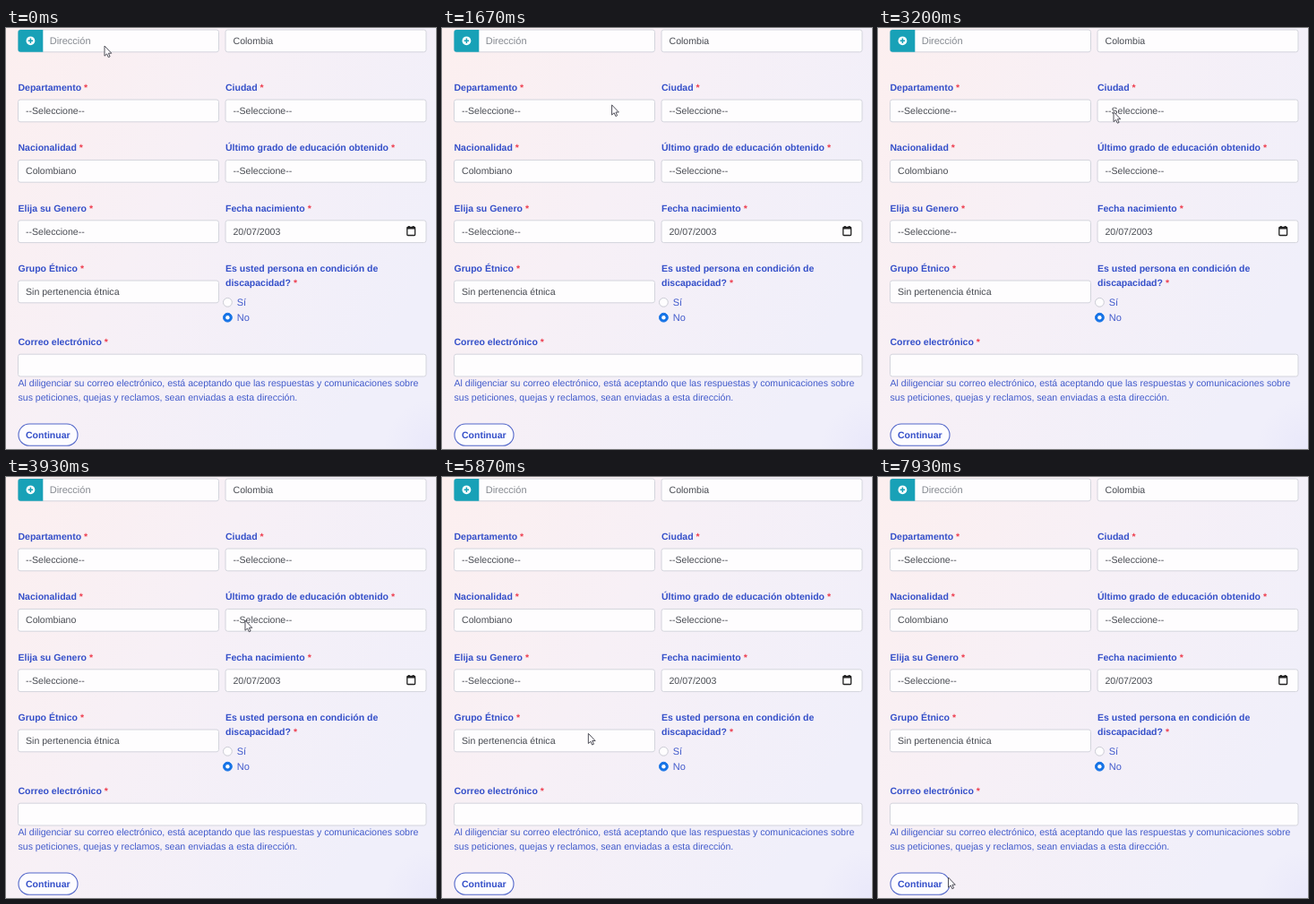
Write an HTML page that moves like this. It is 480 px wide and 470 px high and loops after 8000 ms.

```html
<!DOCTYPE html>
<html lang="es">
<head>
<meta charset="utf-8">
<title>Formulario</title>
<style>
  html, body { margin: 0; width: 100%; height: 100%; overflow: hidden; }
  svg { display: block; width: 100%; height: 100%; }
  text {
    font: 10.57px "Liberation Sans", Arial, sans-serif;
    fill: #484b52;
    text-rendering: geometricPrecision;
  }
  .label { font-weight: bold; font-size: 10.5px; fill: #344fc9; }
  .label tspan { fill: #ee3f50; }
  .help { fill: #415acb; }
  .option { font-size: 11px; }
  .hint { font-size: 11px; fill: #858990; }
  .field { fill: #fefdfe; stroke: #d3d4dc; }
</style>
</head>
<body>
<svg viewBox="0 0 480 470" preserveAspectRatio="none">
  <defs>
    <linearGradient id="base" x1="0" y1="0" x2="1" y2="0.55">
      <stop offset="0" stop-color="#fcefef"/>
      <stop offset="0.45" stop-color="#f7f0f6"/>
      <stop offset="1" stop-color="#f0effa"/>
    </linearGradient>
    <radialGradient id="corner" cx="1" cy="1" r="0.12">
      <stop offset="0" stop-color="#e9e8fa"/>
      <stop offset="1" stop-color="#e9e8fa" stop-opacity="0"/>
    </radialGradient>
    <filter id="soft" filterUnits="userSpaceOnUse" x="0" y="0" width="480" height="470"
      color-interpolation-filters="sRGB">
      <feGaussianBlur stdDeviation="0.4"/>
    </filter>
  </defs>
  <rect width="480" height="470" fill="url(#base)"/>
  <rect width="480" height="470" fill="url(#corner)"/>
  <g id="form" filter="url(#soft)"></g>
  <path id="cursor" d="M0 0V11.2L2.6 8.9L4.3 12.7L6.1 11.9L4.4 8.2H7.8Z"
    fill="#fdfcff" stroke="#505059" stroke-width="1" stroke-linejoin="round"/>
</svg>
<script>
const NS = "http://www.w3.org/2000/svg";
const form = document.getElementById("form");
const cursor = document.getElementById("cursor");
const LEFT = 13.5, RIGHT = 245;

function add(tag, attrs, content) {
  const el = document.createElementNS(NS, tag);
  for (const key in attrs) el.setAttribute(key, attrs[key]);
  if (content) el.textContent = content;
  form.append(el);
  return el;
}

function write(x, y, content, cls = "") {
  return add("text", { x, y, class: cls }, content);
}

function label(x, y, content, required = true) {
  const el = write(x, y, content, "label");
  if (!required) return;
  el.append(" ");
  const star = document.createElementNS(NS, "tspan");
  star.textContent = "*";
  el.append(star);
}

function field(x, y, content, width = 224) {
  add("rect", { x, y, width, height: 24.8, rx: 2.5, class: "field" });
  if (content) write(x + 8.5, y + 16, content);
}

function radio(y, content, on) {
  add("circle", { cx: 247.4, cy: y, r: 4.9, fill: on ? "#1673e6" : "#fefdfe", stroke: on ? "#1673e6" : "#c9cad3" });
  if (on) add("circle", { cx: 247.4, cy: y, r: 2.2, fill: "#fff" });
  write(257.7, y + 3.3, content, "help option");
}

function build() {
  field(LEFT, 2, "");
  add("path", { d: "M41.3 2H16.3Q13.5 2 13.5 4.8V24Q13.5 26.8 16.3 26.8H41.3Z", fill: "#18a1b7" });
  add("circle", { cx: 27.4, cy: 14.3, r: 4.9, fill: "#f5fcfd" });
  add("path", { d: "M24.7 14.3H30.1M27.4 11.6V17", stroke: "#18a1b7", "stroke-width": 1.5 });
  write(48.7, 18.1, "Dirección", "hint");
  field(RIGHT, 2, "Colombia");

  const pick = "--Seleccione--";
  const rows = [
    ["Departamento", pick, "Ciudad", pick],
    ["Nacionalidad", "Colombiano", "Último grado de educación obtenido", pick],
    ["Elija su Genero", pick, "Fecha nacimiento", "20/07/2003"]
  ];
  rows.forEach(([nameA, valueA, nameB, valueB], i) => {
    const y = 80 + i * 67.4;
    label(LEFT, y - 10.2, nameA);
    field(LEFT, y, valueA);
    label(RIGHT, y - 10.2, nameB);
    field(RIGHT, y, valueB);
  });

  add("rect", { x: 447.8, y: 222.5, width: 8.8, height: 9, rx: 0.8, fill: "none", stroke: "#222", "stroke-width": 1.3 });
  add("path", { d: "M447.8 223.5H456.6M449.8 221V223M454.6 221V223", stroke: "#222", "stroke-width": 2 });

  label(LEFT, 272, "Grupo Étnico");
  field(LEFT, 282, "Sin pertenencia étnica");
  label(RIGHT, 272, "Es usted persona en condición de", false);
  label(RIGHT, 287.7, "discapacidad?");
  radio(306.3, "Sí", false);
  radio(323.2, "No", true);

  label(LEFT, 354, "Correo electrónico");
  field(LEFT, 364.2, "", 455.5);
  write(LEFT, 400.4, "Al diligenciar su correo electrónico, está aceptando que las respuestas y comunicaciones sobre", "help");
  write(LEFT, 415.6, "sus peticiones, quejas y reclamos, sean enviadas a esta dirección.", "help");

  add("rect", { x: 14, y: 442, width: 66, height: 24.3, rx: 12.1, fill: "#fdfcff", stroke: "#5266c9", "stroke-width": 1.1 });
  write(22, 457.5, "Continuar", "label");
}

// Pointer stops: time in ms, x, y
const stops = [
  [0, 110, 20], [400, 121, 24], [930, 139.5, 35], [1300, 164, 56], [1730, 194, 91],
  [2050, 242, 93], [2400, 263, 93.5], [3530, 263, 93.5], [3930, 267, 160],
  [4330, 262, 173], [4730, 190, 231], [5000, 185.5, 239], [5700, 180, 247],
  [6200, 130, 365], [6600, 97, 431], [6800, 97, 431], [7300, 84, 445],
  [7600, 78.5, 447], [8000, 78.5, 447]
];
const LOOP = 8000, STEP = 1000 / 15;
const LEAD = 5; // frames fall on times rounded to 10 ms

function draw(time) {
  const t = Math.floor(((time + LEAD) % LOOP) / STEP) * STEP;
  const i = stops.findIndex(stop => stop[0] > t);
  const [t0, x0, y0] = stops[i - 1];
  const [t1, x1, y1] = stops[i];
  const k = (t - t0) / (t1 - t0);
  const x = x0 + (x1 - x0) * k, y = y0 + (y1 - y0) * k;
  cursor.setAttribute("transform", `translate(${x.toFixed(2)} ${y.toFixed(2)})`);
}

build();
const start = performance.now();
function tick() {
  draw(performance.now() - start);
  requestAnimationFrame(tick);
}
tick();
</script>
</body>
</html>
```
